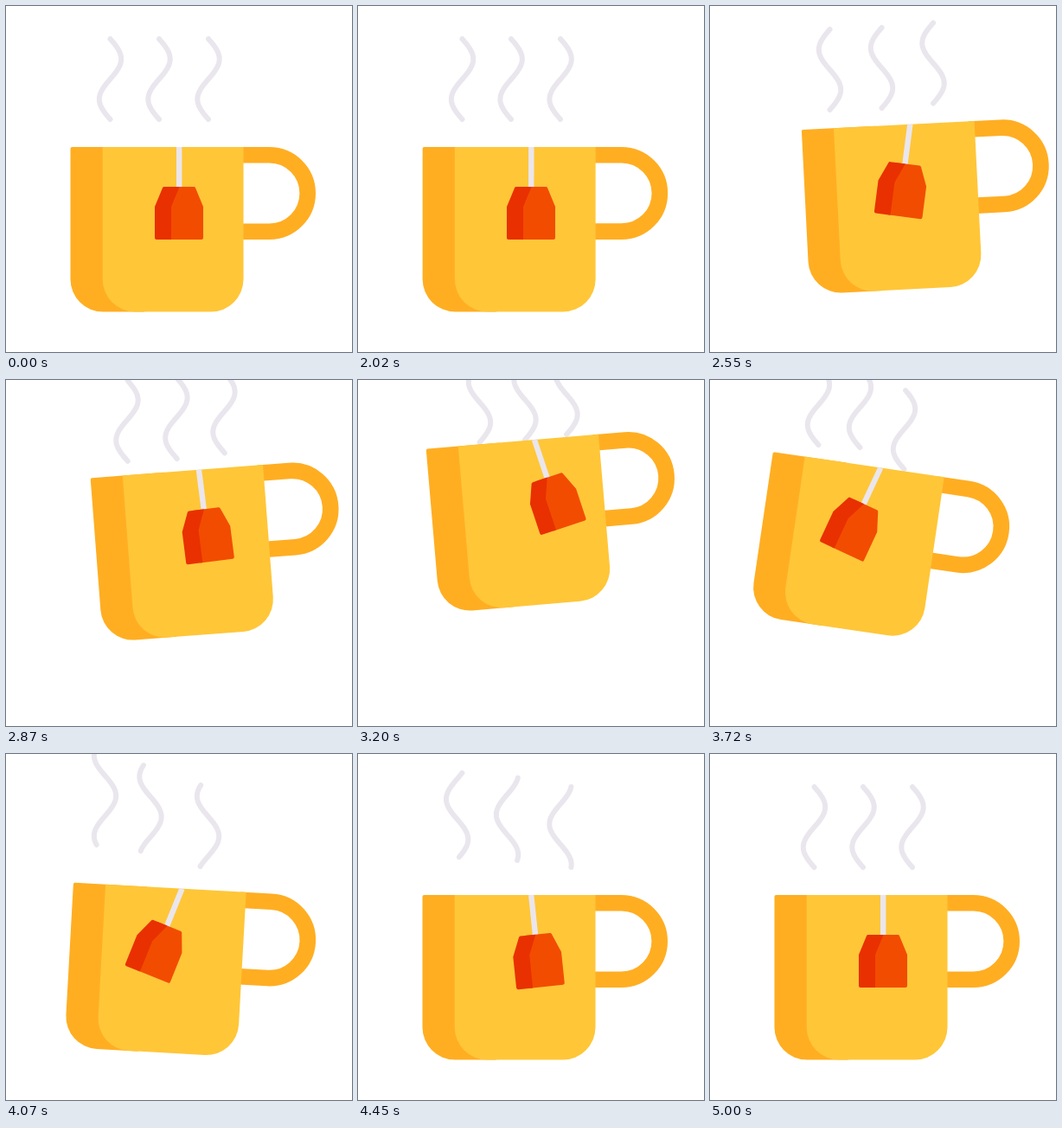
Recreate the animation shown at these times as an HTML page. Size 400 px wide and 400 px high, loop 5200 ms.

```html
<!DOCTYPE html>
<html lang="en">
<head>
<meta charset="utf-8">
<title>Cup of tea</title>
<style>
  html, body { margin: 0; width: 100%; height: 100%; overflow: hidden; background: #fff; }
  svg { display: block; width: 100%; height: 100%; }
</style>
</head>
<body>
<svg viewBox="0 0 400 400">
  <g id="steam" fill="none" stroke="#eae6ed" stroke-width="6" stroke-linecap="round" stroke-linejoin="round">
    <path/><path/><path/>
  </g>
  <g id="cup">
    <path d="M268 172.3H304.5a44.2 44.2 0 0 1 0 88.4H268" fill="none" stroke="#ffae22" stroke-width="18.6"/>
    <path d="M76.5 163H160V353.5H112a37.5 37.5 0 0 1-37.5-37.5V165a2 2 0 0 1 2-2z" fill="#ffae22"/>
    <path d="M111.7 163H274.5V316a37.5 37.5 0 0 1-37.5 37.5H149.2a37.5 37.5 0 0 1-37.5-37.5z" fill="#ffc638"/>
    <g id="bag">
      <path d="M200.2 163V211" stroke="#eae6ed" stroke-width="6.4"/>
      <path d="M183 209H217a2 2 0 0 1 2 1.3L228 232V268a2 2 0 0 1-2 2H188V209z" fill="#f24c00"/>
      <path d="M183 209H200.5L191 232V270H174a2 2 0 0 1-2-2V232L181 210.3a2 2 0 0 1 2-1.3z" fill="#e93000"/>
    </g>
  </g>
</svg>
<script>
const LOOP = 5200;
const START = 2000;

// Smooth curve through [time, value] points, without overshoot and flat at both ends.
function track(...points) {
  const last = points.length - 1;
  const rate = i => (points[i + 1][1] - points[i][1]) / (points[i + 1][0] - points[i][0]);
  const slopes = points.map((_, i) => {
    if (i === 0 || i === last) return 0;
    const a = rate(i - 1), b = rate(i);
    return a * b > 0 ? 2 * a * b / (a + b) : 0;
  });
  return t => {
    if (t <= points[0][0]) return points[0][1];
    if (t >= points[last][0]) return points[last][1];
    const i = points.findIndex(p => p[0] > t) - 1;
    const [t0, v0] = points[i], [t1, v1] = points[i + 1];
    const d = t1 - t0, s = (t - t0) / d, r = 1 - s;
    return v0 * (1 + 2 * s) * r * r + slopes[i] * d * s * r * r
         + v1 * s * s * (3 - 2 * s) - slopes[i + 1] * d * s * s * r;
  };
}

const cupX = track([START, 0], [2550, 36], [2610, 36.5], [3070, 21], [3200, 12],
  [3700, -16.7], [4070, -2], [4300, 0]);
const cupY = track([START, 0], [2550, -25], [3070, -80], [3200, -92], [3350, -97],
  [3620, -80], [3720, -66.5], [4070, -9], [4170, -2], [4300, 0]);
const cupTilt = track([START, 0], [2550, -2.9], [3130, -5], [3200, -4.9],
  [3720, 8.4], [4070, 3.2], [4300, 0]);
const bagSwing = track([START, 0], [2400, 10], [2550, 7.4], [3200, -18.4], [3720, 25],
  [3830, 27], [4070, 22], [4460, -6], [4730, 2.5], [5000, 0]);

const STEAM_TIMES = [START, 2550, 3200, 3720, 4070, 4400, 4720, 5000];
const steamTrack = (...values) =>
  track(...[0, ...values, 0].map((v, i) => [STEAM_TIMES[i], v]));
const wavePhase = late =>
  track([START, 0], [2550, 1], [3200, 3], [3720, 4], [4070, late], [5000, 6]);

const WAVE = 93;
const plumes = [
  { x: 120.5, dx: steamTrack(18, 20, 5, -6, -6, -3), dy: steamTrack(-11, -59, -56, -26, -13, -7),
    stretch: steamTrack(0, 0, 0, 12, 5, 1), phase: wavePhase(4.28) },
  { x: 177, dx: steamTrack(21.5, 16, -3.5, -10, -5, -2), dy: steamTrack(-13, -62, -53, -19, -9, -4),
    stretch: steamTrack(0, 0, 0, 6, 3, 0), phase: wavePhase(4.65) },
  { x: 234, dx: steamTrack(24, 7, -9.5, -0.5, 0, 0), dy: steamTrack(-18.5, -68, -28, -1, 0, 0),
    stretch: steamTrack(0, 0, -2, 1, 0, 0), phase: wavePhase(4.75) }
];

function plumePath(plume, t) {
  const x = plume.x + plume.dx(t), bottom = 131 + plume.dy(t);
  const height = WAVE + plume.stretch(t), phase = plume.phase(t);
  const steps = 40, points = [];
  for (let i = 0; i <= steps; i++) {
    const up = height * i / steps;
    const sway = -12.7 * Math.sin(2 * Math.PI * up / WAVE + Math.PI * phase);
    points.push((x + sway).toFixed(2) + " " + (bottom - up).toFixed(2));
  }
  return "M" + points.join("L");
}

const cup = document.getElementById("cup");
const bag = document.getElementById("bag");
const steamPaths = document.querySelectorAll("#steam path");

function draw(t) {
  const tilt = cupTilt(t);
  cup.setAttribute("transform", `translate(${cupX(t)} ${cupY(t)}) rotate(${tilt} 174 258)`);
  bag.setAttribute("transform", `rotate(${bagSwing(t) - tilt} 200.2 163)`);
  plumes.forEach((plume, i) => steamPaths[i].setAttribute("d", plumePath(plume, t)));
}

const begin = performance.now();
function tick() {
  draw((performance.now() - begin) % LOOP);
  requestAnimationFrame(tick);
}
tick();
</script>
</body>
</html>
```
